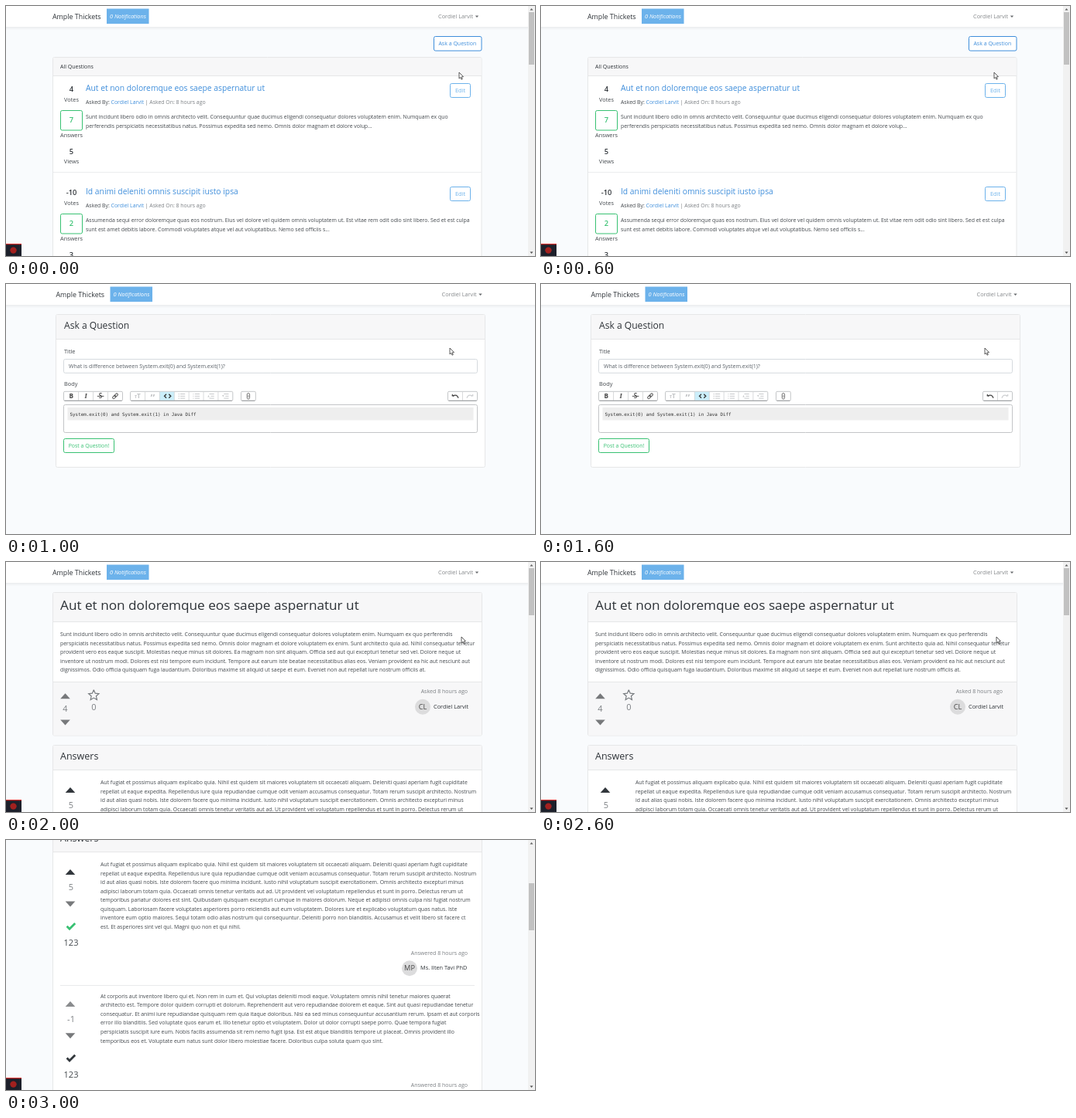
Animation, 683 px wide and 324 px high, one loop 4000 ms. Source, as an HTML page with a canvas:

```html
<!DOCTYPE html>
<html lang="en">
<head>
<meta charset="utf-8">
<title>Question board</title>
<style>
  html, body { margin: 0; width: 100%; height: 100%; overflow: hidden; background: #f9fbfd; }
  canvas { display: block; width: 683px; height: 324px; }
</style>
</head>
<body>
<canvas id="stage"></canvas>
<script>
const W = 683, H = 324, SCENE_MS = 1000;
const BRAND = 'Ample Thickets', USER = 'Cordiel Larvit', EXPERT = 'Ms. Ilten Tavi PhD';
const SANS = '"Open Sans", "Noto Sans", sans-serif';
const MONO = '"DejaVu Sans Mono", monospace';
const INK = '#43484d', DARK = '#2d3237', GREY = '#7b7f83', LINE = '#e6e7e8', HEAD = '#f7f7f8';
const BLUE = '#3f8edb', SKY = '#6cb2eb', GREEN = '#38c172';
const LABEL = 7.35, BODY = 6.9, STEP = 11.55;

const canvas = document.getElementById('stage');
const c = canvas.getContext('2d');
const dpr = window.devicePixelRatio || 1;
canvas.width = W * dpr;
canvas.height = H * dpr;

function text(str, x, y, { size = LABEL, color = INK, align = 'left', style = '', family = SANS } = {}) {
  c.font = `${style} ${size}px ${family}`;
  c.textAlign = align;
  c.fillStyle = color;
  c.fillText(str, x, y);
  return c.measureText(str).width;
}

function lines(list, x, y) {
  list.forEach((s, i) => text(s, x, y + i * STEP, { size: BODY }));
}

function rect(x, y, w, h, color) {
  c.fillStyle = color;
  c.fillRect(x, y, w, h);
}

function box(x, y, w, h, stroke, fill, r = 2) {
  c.beginPath();
  c.roundRect(x, y, w, h, r);
  if (fill) { c.fillStyle = fill; c.fill(); }
  c.strokeStyle = stroke;
  c.lineWidth = 1;
  c.stroke();
}

function shape(points, color) {
  c.beginPath();
  points.forEach(([x, y]) => c.lineTo(x, y));
  c.closePath();
  c.fillStyle = color;
  c.fill();
}

function stroke(points, color, width = 1) {
  c.beginPath();
  points.forEach(([x, y]) => c.lineTo(x, y));
  c.strokeStyle = color;
  c.lineWidth = width;
  c.stroke();
}

function disc(x, y, r, color) {
  c.beginPath();
  c.arc(x, y, r, 0, Math.PI * 2);
  c.fillStyle = color;
  c.fill();
}

// dir 1 points down, -1 points up
function triangle(x, y, w, h, dir, color) {
  shape([[x - w / 2, y - dir * h / 2], [x + w / 2, y - dir * h / 2], [x, y + dir * h / 2]], color);
}

function card(x, y, w, h, headH) {
  box(x, y, w, h, LINE, '#fff');
  rect(x + .5, y + .5, w - 1, headH - .5, HEAD);
  rect(x, y + headH - .5, w, 1, LINE);
}

function navbar(dx) {
  for (let i = 0; i < 4; i++) rect(0, 27 + i, W, 1, `rgba(0,0,0,${.05 - i * .0125})`);
  rect(0, 0, W, 27, '#fff');
  text(BRAND, 60 + dx, 16.6, { size: 8.9, color: DARK });
  rect(130 + dx, 3.5, 54.5, 19.5, SKY);
  text('0 Notifications', 134 + dx, 16.3, { color: '#fff', style: 'italic' });
  text(USER, 558 + dx, 16.3, { color: '#85888b' });
  triangle(608 + dx, 13.7, 4.4, 2.4, 1, '#66696c');
}

function scrollbar(top, height) {
  rect(674, 0, 9, H, '#f1f1f1');
  rect(675, top, 7, height, '#c1c1c1');
  triangle(678.5, 4.3, 4, 2.4, -1, '#606060');
  triangle(678.5, 319.7, 4, 2.4, 1, '#505050');
}

function badge() {
  rect(0, 308, 20, 16, '#1d202b');
  rect(0, 308, 20, 1.2, '#d8302f');
  disc(9.5, 316.6, 4.2, '#a3211f');
}

function pointer(x, y) {
  const pts = [[0, 0], [0, 8], [1.8, 6.4], [3, 9.2], [4.3, 8.6], [3.1, 5.9], [5.5, 5.7]].map(([a, b]) => [x + a, y + b]);
  shape(pts, '#fff');
  stroke([...pts, pts[0]], '#333', .8);
}

function question(y, { votes, answers, views, title, body }) {
  const mid = { align: 'center' };
  const num = { ...mid, size: 9.3, style: '600', color: DARK };
  text(votes, 84.5, y + 21, num);
  text('Votes', 84.5, y + 34, mid);
  box(70.5, y + 45.5, 28, 25.5, GREEN, '#fff');
  text(answers, 84.5, y + 61.4, { ...num, color: GREEN });
  text('Answers', 84.5, y + 80, mid);
  text(views, 84.5, y + 102, num);
  text('Views', 84.5, y + 114, mid);
  text(title, 103, y + 20, { size: 10.3, color: BLUE });
  let x = 103;
  x += text('Asked By: ', x, y + 37, { size: BODY });
  x += text(USER, x, y + 37, { size: BODY, color: BLUE });
  text(' | Asked On: 8 hours ago', x, y + 37, { size: BODY, color: GREY });
  box(573.5, y + 10.5, 26, 18, SKY, '#fff');
  text('Edit', 586.5, y + 22, { ...mid, color: SKY });
  lines(body, 103, y + 56.4);
}

function listPage() {
  navbar(0);
  box(552.5, 39.5, 61.5, 18.5, BLUE, '#fff');
  text('Ask a Question', 582.8, 51.3, { size: 7, color: BLUE, align: 'center' });
  card(60.5, 66.5, 553.5, 300, 24);
  text('All Questions', 70, 80.8, { size: 7, color: DARK });
  question(90, {
    votes: '4', answers: '7', views: '5',
    title: 'Aut et non doloremque eos saepe aspernatur ut',
    body: [
      'Sunt incidunt libero odio in omnis architecto velit. Consequuntur quae ducimus eligendi consequatur dolores voluptatem enim. Numquam ex quo',
      'perferendis perspiciatis necessitatibus natus. Possimus expedita sed nemo. Omnis dolor magnam et dolore volup...']
  });
  rect(61, 215, 553, 1, '#ebecee');
  question(224, {
    votes: '-10', answers: '2', views: '3',
    title: 'Id animi deleniti omnis suscipit iusto ipsa',
    body: [
      'Assumenda sequi error doloremque quas eos nostrum. Eius vel dolore vel quidem omnis voluptatem ut. Est vitae rem odit odio sint libero. Sed et est culpa',
      'sunt est amet debitis labore. Commodi voluptates atque vel aut voluptatibus. Nemo sed officiis s...']
  });
  scrollbar(8, 68);
  badge();
  pointer(585, 86);
}

function buttons(x, y, count, width, active = -1) {
  const w = count * width;
  box(x, y, w, 12, '#c4c6c8', '#fff', 1.5);
  if (active >= 0) rect(x + active * width, y + .5, width, 11, '#cbeefa');
  for (let i = 1; i < count; i++) rect(x + i * width - .4, y, .8, 12, '#d0d2d4');
  rect(x + 1, y + 11.5, w - 2, 1, '#9a9c9e');
}

function curl(x, y, dir, color) {
  c.beginPath();
  c.moveTo(x - dir * 3, y - .5);
  c.quadraticCurveTo(x + dir * 2.5, y - 2.8, x + dir * 4, y + 2.5);
  c.strokeStyle = color;
  c.lineWidth = 1.3;
  c.stroke();
  shape([[x - dir * 4.5, y], [x - dir * 4, y - 3], [x - dir * 1.2, y + .8]], color);
}

function chain(x, y) {
  c.save();
  c.translate(x, y);
  c.rotate(-Math.PI / 4);
  box(-4.2, -1.4, 4.8, 2.8, '#555', null, 1.4);
  box(-.6, -1.4, 4.8, 2.8, '#555', null, 1.4);
  c.restore();
}

function rows(x, y, numbered, indent) {
  const tone = '#c6c8ca';
  for (let i = -1; i <= 1; i++) {
    const inset = indent && i === 0 ? 2 : 0;
    rect(x - 2 + inset, y + i * 2.8 - .5, 6.2 - inset, 1, tone);
    if (!indent) rect(x - 4.3, y + i * 2.8 - .6, numbered ? .8 : 1.2, 1.3, tone);
  }
  if (indent) triangle(x - 3, y, 2.4, 2.4, indent, tone);
}

function toolbar(y) {
  const mid = { align: 'center', color: '#444' }, pale = { align: 'center', color: '#c3c5c7' };
  buttons(74.5, y - 6, 4, 19);
  text('B', 84.3, y + 3, { ...mid, size: 8.2, style: 'bold' });
  text('I', 103.2, y + 3, { ...mid, size: 8.5, style: 'italic bold', family: '"Liberation Serif", serif' });
  text('S', 122, y + 3, { ...mid, size: 8.2, style: '600' });
  rect(117.8, y - .4, 8.6, .9, '#444');
  chain(141, y);

  buttons(160.5, y - 6, 7, 18.9, 2);
  text('T', 171.5, y + 3, { ...pale, size: 8.3, style: 'bold' });
  text('T', 167.5, y + 3, { ...pale, size: 5.5, style: 'bold' });
  text('”', 189.5, y + 7, { ...pale, size: 13, style: 'bold' });
  stroke([[207, y - 2.5], [204.5, y], [207, y + 2.5]], '#333', 1.3);
  stroke([[210.3, y - 2.5], [212.8, y], [210.3, y + 2.5]], '#333', 1.3);
  rows(227, y, false, 0);
  rows(245.8, y, true, 0);
  rows(264.5, y, false, -1);
  rows(283.3, y, false, 1);

  buttons(303.5, y - 6, 1, 18.8);
  box(311.2, y - 3.8, 3.4, 7.6, '#777', null, 1.7);
  stroke([[312.9, y - 1.5], [312.9, y + 2]], '#777', .8);

  buttons(570.5, y - 6, 2, 19);
  curl(580, y, 1, '#444');
  curl(599, y, -1, '#cfd1d3');
}

function formPage() {
  navbar(4.5);
  card(64.5, 39.5, 554, 198, 32);
  text('Ask a Question', 75, 57.6, { size: 12.1, color: DARK });
  text('Title', 75, 89.6);
  box(74.5, 97.5, 534, 17.8, '#d5dade', '#fff');
  text('What is difference between System.exit(0) and System.exit(1)?', 81, 108.8, { size: 7.05, color: '#596067' });
  text('Body', 75, 131.6);
  toolbar(145.3);
  box(74.5, 156.5, 534, 36, '#c3c5c7', '#fff');
  rect(79.5, 160, 524, 16.5, '#eee');
  text('System.exit(0) and System.exit(1) in Java Diff', 82.5, 170.6, { size: 5.9, color: '#333', family: MONO });
  box(74.5, 200.5, 65, 18, GREEN, '#fff');
  text('Post a Question!', 107, 212, { size: 6.9, color: GREEN, align: 'center' });
  pointer(573, 83);
}

function star(x, y, r) {
  const pts = [];
  for (let i = 0; i <= 10; i++) {
    const a = -Math.PI / 2 + i * Math.PI / 5, d = i % 2 ? r * .47 : r;
    pts.push([x + d * Math.cos(a), y + d * Math.sin(a)]);
  }
  stroke(pts, '#777b7f', 1.2);
}

function author(when, name, initials, x, y) {
  text(when, 596, y, { size: 7.05, color: GREY, align: 'right' });
  disc(x, y + 17.4, 10, '#dcdcdd');
  text(initials, x, y + 20.6, { size: 9.2, color: '#444', align: 'center' });
  text(name, x + 14, y + 19.6, { color: DARK });
}

function answer(y, { votes, body, upColor, tick }) {
  const mid = { size: 11, align: 'center' };
  lines(body, 122, y);
  triangle(83, y + 7.6, 12.6, 7, -1, upColor);
  text(votes, 84, y + 30.8, { ...mid, color: GREY });
  triangle(83, y + 49, 12.6, 7, 1, '#77797b');
  stroke([[78.6, y + 77.8], [82, y + 81.2], [89.2, y + 74]], tick, 2.8);
  text('123', 84, y + 103, { ...mid, color: INK });
  author('Answered 8 hours ago', EXPERT, 'MP', 521, y + 114.8);
}

const post = [
  'Sunt incidunt libero odio in omnis architecto velit. Consequuntur quae ducimus eligendi consequatur dolores voluptatem enim. Numquam ex quo perferendis',
  'perspiciatis necessitatibus natus. Possimus expedita sed nemo. Omnis dolor magnam et dolore voluptatem ex enim. Sunt architecto quia ad. Nihil consequatur tenetur',
  'provident vero eos eaque suscipit. Molestias neque minus sit dolores. Ea magnam non sint aliquam. Officia sed aut qui excepturi tenetur sed vel. Dolore neque ut',
  'inventore ut nostrum modi. Dolores est nisi tempore eum incidunt. Tempore aut earum iste beatae necessitatibus alias eos. Veniam provident ea hic aut nesciunt aut',
  'dignissimos. Odio officia quisquam fuga laudantium. Doloribus maxime sit aliquid ut saepe et eum. Eveniet non aut repellat iure nostrum officiis at.'];

const replies = [
  {
    votes: '5', upColor: '#32373c', tick: GREEN,
    body: [
      'Aut fugiat et possimus aliquam explicabo quia. Nihil est quidem sit maiores voluptatem sit occaecati aliquam. Deleniti quasi aperiam fugit cupiditate',
      'repellat ut eaque expedita. Repellendus iure quia repudiandae cumque odit veniam accusamus consequatur. Totam rerum suscipit architecto. Nostrum',
      'id aut alias quasi nobis. Iste dolorem facere quo minima incidunt. Iusto nihil voluptatum suscipit exercitationem. Omnis architecto excepturi minus',
      'adipisci laborum totam quia. Occaecati omnis tenetur veritatis aut ad. Ut provident vel voluptatum repellendus et sunt in porro. Delectus rerum ut',
      'temporibus pariatur dolores est sint. Quibusdam quisquam excepturi cumque in maiores dolorum. Neque et adipisci omnis culpa nisi fugiat nostrum',
      'quisquam. Laboriosam facere voluptates asperiores porro reiciendis aut eum voluptatem. Dolores iure et explicabo voluptatum quas natus. Iste',
      'inventore eum optio maiores. Sequi totam odio alias nostrum qui consequuntur. Deleniti porro non blanditiis. Accusamus et velit libero sit facere ct',
      'est. Et asperiores sint vel qui. Magni quo non et qui nihil.']
  },
  {
    votes: '-1', upColor: '#8a8c8e', tick: '#32373c',
    body: [
      'At corporis aut inventore libero qui et. Non rem in cum et. Qui voluptas deleniti modi eaque. Voluptatem omnis nihil tenetur maiores quaerat',
      'architecto est. Tempore dolor quidem corrupti et dolorum. Reprehenderit aut vero repudiandae dolorem et eaque. Sint aut quasi repudiandae tenetur',
      'consequatur. Et animi iure repudiandae quisquam rem quia itaque doloribus. Nisi ea sed minus consequuntur accusantium rerum. Ipsam et aut corporis',
      'error illo blanditiis. Sed voluptate quos earum et. Illo tenetur optio et voluptatem. Dolor ut dolor corrupti saepe porro. Quae tempora fugiat',
      'perspiciatis suscipit iure eum. Nobis facilis assumenda sit rem nemo fugit ipsa. Est est atque blanditiis tempore ut placeat. Omnis provident illo',
      'temporibus eos et. Voluptate eum natus sunt dolor libero molestiae facere. Doloribus culpa soluta quam quo sint.']
  }];

function threadPage(scroll) {
  c.save();
  c.translate(0, -scroll);
  navbar(0);
  card(60.5, 39.5, 554, 185.5, 38);
  text('Aut et non doloremque eos saepe aspernatur ut', 70, 62.2, { size: 17.2, color: DARK });
  lines(post, 70, 96);
  rect(61, 155.5, 553, 69, HEAD);
  rect(61, 155, 553, 1, LINE);
  triangle(76.5, 173.7, 12.6, 7, -1, '#77797b');
  text('4', 76.5, 194, { size: 11, color: GREY, align: 'center' });
  triangle(76.5, 208, 12.6, 7, 1, '#77797b');
  star(113.3, 172.8, 7);
  text('0', 113.3, 191.8, { size: 11, color: GREY, align: 'center' });
  author('Asked 8 hours ago', USER, 'CL', 538, 170.4);

  card(60.5, 237.5, 554, 500, 32);
  text('Answers', 70, 255.6, { size: 12.5, color: DARK });
  answer(288, replies[0]);
  rect(70, 442, 535, 1, '#e9eaeb');
  answer(458.8, replies[1]);
  c.restore();
  scrollbar(8 + scroll * .189, 61);
  badge();
}

const scenes = [
  listPage,
  formPage,
  () => { threadPage(0); pointer(588, 97); },
  () => threadPage(254)
];

const start = performance.now();
function draw() {
  const t = Math.max(0, performance.now() - start);
  c.setTransform(dpr, 0, 0, dpr, 0, 0);
  rect(0, 0, W, H, '#f9fbfd');
  scenes[Math.floor(t / SCENE_MS) % scenes.length]();
  requestAnimationFrame(draw);
}
draw();
</script>
</body>
</html>
```
